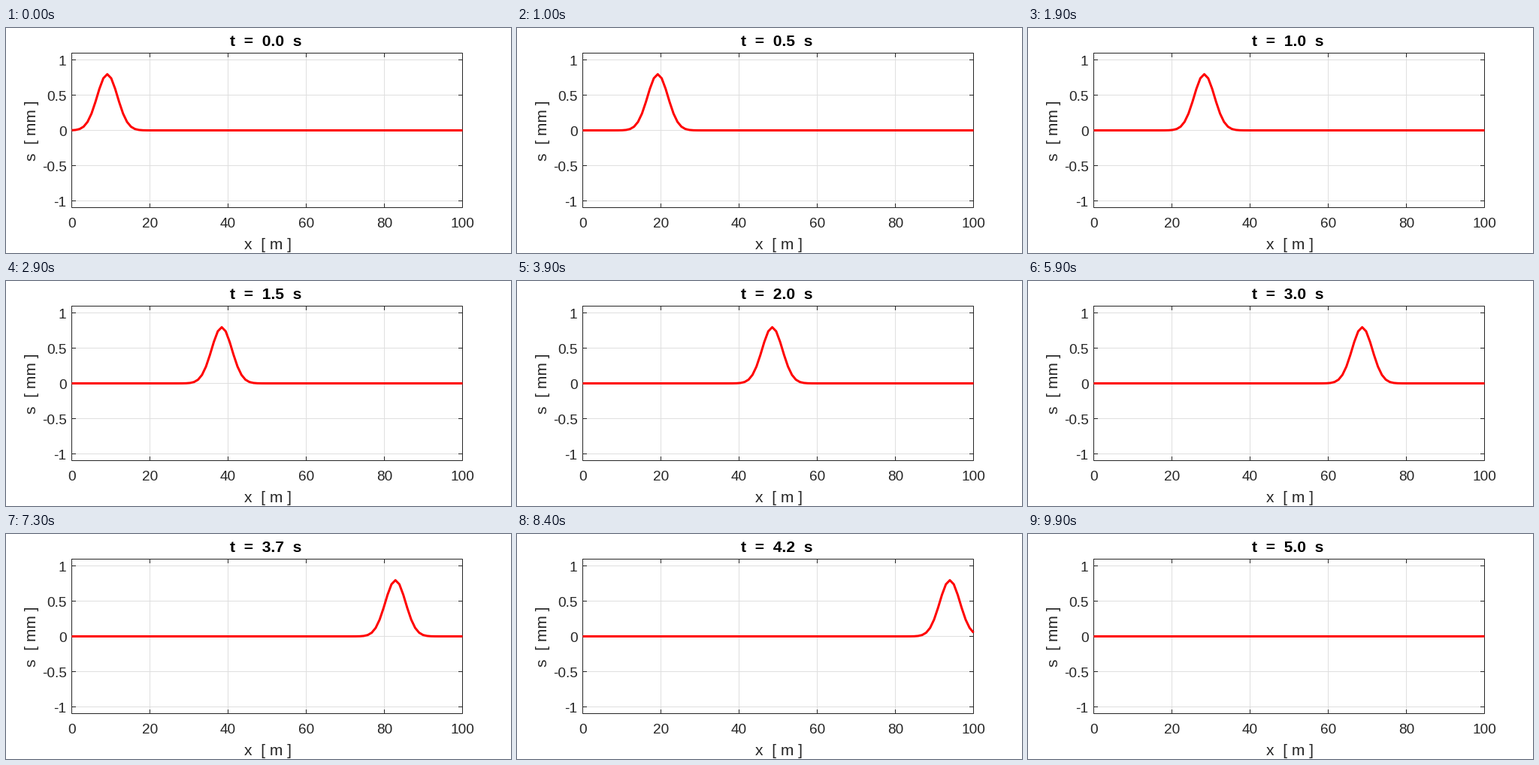
These frames come from a looping animation (672 by 300 pixels, 10000 ms). A matplotlib script:

```python
import numpy as np
import matplotlib.pyplot as plt
from matplotlib.animation import FuncAnimation

W, H, DPI = 672, 300, 96
PX = 72 / DPI                     # points per pixel
LEFT, RIGHT, TOP, BOTTOM = 87.5, 607.5, 33.5, 239.5
FRAMES, DURATION = 100, 5.0
SPEED, AMP, WIDTH2 = 20.0, 0.8, 13.5
INK, GRID = "#262626", "#dfdfdf"

plt.rcParams["font.family"] = "Liberation Sans"
fig = plt.figure(figsize=(W / DPI, H / DPI), dpi=DPI, facecolor="white")
ax = fig.add_axes([0, 0, 1, 1])
ax.set(xlim=(0, W), ylim=(H, 0))
ax.axis("off")


def to_px(x):
    return LEFT + x * (RIGHT - LEFT) / 100


def to_py(s):
    return (TOP + BOTTOM) / 2 - s * (BOTTOM - TOP) / 2.2


def rule(xs, ys, color=INK, z=2):
    ax.plot(xs, ys, color=color, lw=PX, snap=False, zorder=z,
            solid_capstyle="projecting", solid_joinstyle="miter")


def label(x, y, text, size=19, color=INK, **kw):
    return ax.text(x, y, text, fontsize=size * PX, color=color,
                   va="baseline", **kw)


for v in range(0, 101, 20):
    x = to_px(v)
    if 0 < v < 100:
        rule([x, x], [TOP, BOTTOM], GRID, 1)
        rule([x, x], [TOP, TOP + 5])
        rule([x, x], [BOTTOM, BOTTOM - 5])
    label(x, 266, str(v), ha="center")

for v in (-1, -0.5, 0, 0.5, 1):
    y = np.floor(to_py(v)) + 0.5
    rule([LEFT, RIGHT], [y, y], GRID, 1)
    rule([LEFT, LEFT + 5], [y, y])
    rule([RIGHT, RIGHT - 5], [y, y])
    label(80.5, np.floor(y) + 8, f"{v:g}", ha="right")

rule([LEFT, RIGHT, RIGHT, LEFT, LEFT], [TOP, TOP, BOTTOM, BOTTOM, TOP])

label(317, 295, "x  [ m ]", 21, ha="left")
label(39.5, 177, "s  [ mm ]", 21, ha="left", rotation=90,
      rotation_mode="anchor")
title = label(297.5, 24, "", 21, "black", ha="left", weight="bold")

grid_x = np.linspace(0, 100, 100)
wave, = ax.plot([], [], color="red", lw=3 * PX, snap=False, zorder=3,
                clip_on=False, solid_capstyle="butt",
                solid_joinstyle="round")


def update(i):
    t = DURATION * i / (FRAMES - 1)
    dist = grid_x - grid_x[9] - SPEED * t
    wave.set_data(to_px(grid_x), to_py(AMP * np.exp(-dist**2 / WIDTH2)))
    title.set_text(f"t  =  {t:.1f}  s")
    return wave, title


anim = FuncAnimation(fig, update, frames=FRAMES, interval=100,
                     repeat=True, repeat_delay=0, blit=False)
plt.show()
```
